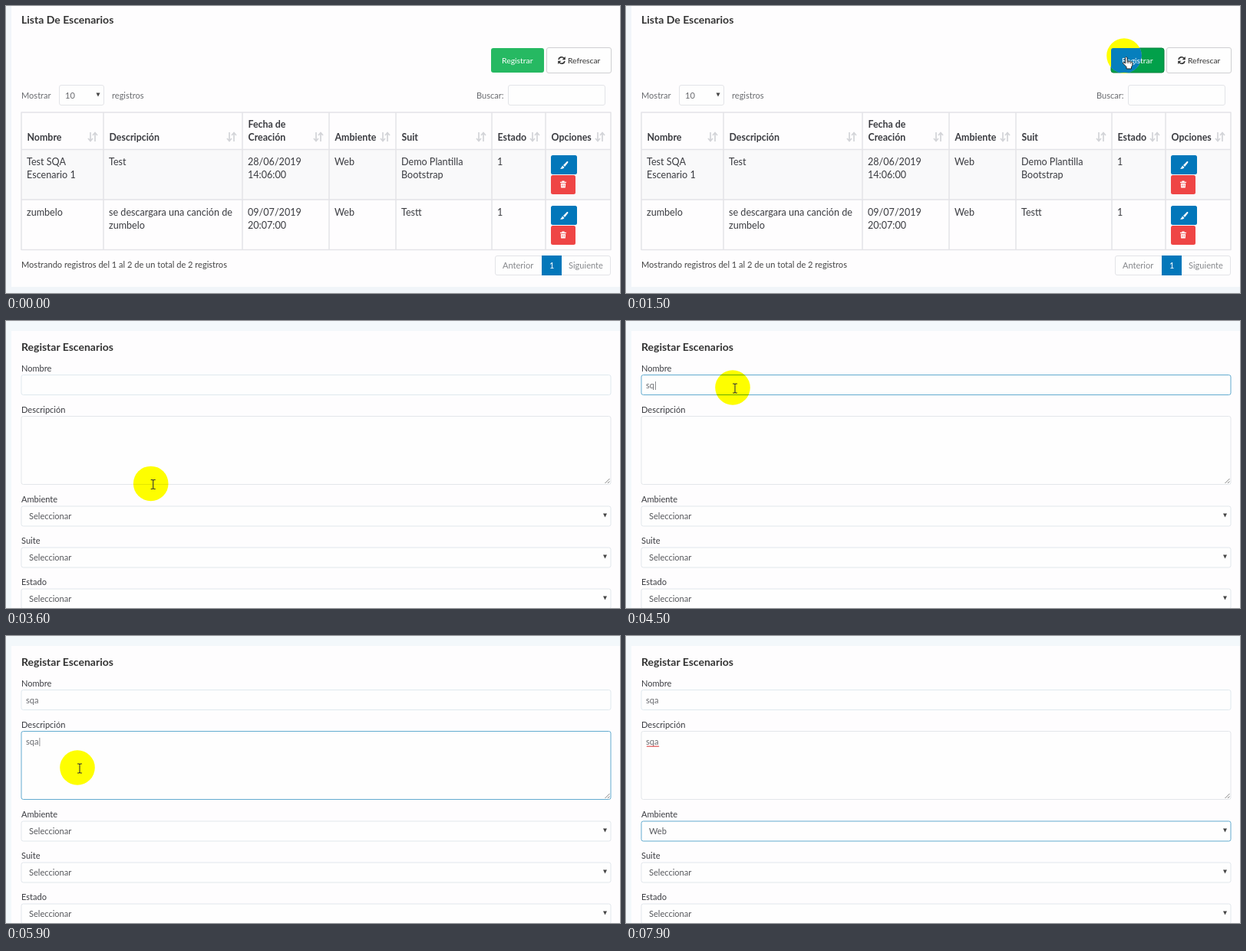
Animation, 800 px wide and 375 px high, one loop 8 s. Source, as an HTML page:

```html
<!DOCTYPE html>
<html lang="es">
<head>
<meta charset="utf-8">
<title>Escenarios</title>
<style>
html, body { margin: 0; width: 100%; height: 100%; overflow: hidden; background: #fefdfe; }
svg { display: block; width: 800px; height: 375px; font: 11.05px Lato, sans-serif; }
.spot { mix-blend-mode: multiply; fill: #ff0; }
</style>
</head>
<body>
<svg id="stage" viewBox="0 0 800 375"></svg>
<script>
const LOOP = 8000, STEP = 100;
const BLUE = '#0277ba', LINE = '#e3e4e8', FOCUS = '#62abcf', DARK = '#3a3b40', GREY = '#6a6c70';
const stage = document.getElementById('stage');

const rect = (x, y, w, h, fill, extra = '') =>
  `<rect x="${x}" y="${y}" width="${w}" height="${h}" fill="${fill}" ${extra}/>`;
const box = (x, y, w, h, stroke = LINE, fill = '#fefefe') =>
  rect(x + .5, y + .5, w - 1, h - 1, fill, `rx="2.5" stroke="${stroke}"`);
const text = (x, y, str, fill = DARK, extra = '') =>
  `<text x="${x}" y="${y}" fill="${fill}" ${extra}>${str}</text>`;
const path = (d, fill, extra = '') => `<path d="${d}" fill="${fill}" ${extra}/>`;
const at = (x, y, body) => `<g transform="translate(${x} ${y})">${body}</g>`;
const lines = (x, y, str, extra) =>
  str.split('|').map((s, i) => text(x, y + i * 17, s, DARK, extra)).join('');
const caretDown = (x, y) => path(`M${x - 2.5} ${y - 2.5}h5l-2.5 5z`, '#444');

// Table page
const BODY = 'font-size="12.6"', HEAD = 'font-size="12.4" font-weight="700"';
const columns = [20, 127, 308, 421, 508, 633, 703, 788];
const headers = ['Nombre', 'Descripción', 'Fecha de|Creación', 'Ambiente', 'Suit', 'Estado', 'Opciones'];
const records = [
  ['Test SQA|Escenario 1', 'Test', '28/06/2019|14:06:00', 'Web', 'Demo Plantilla|Bootstrap', '1'],
  ['zumbelo', 'se descargara una canción de|zumbelo', '09/07/2019|20:07:00', 'Web', 'Testt', '1']
];

const sortIcon = x => at(x, 171, path('M-3 -6V5M-6 2l3 3.5 3-3.5M3 6V-5M0 -2l3-3.5 3 3.5',
  'none', 'stroke="#d3d4d8" stroke-width="1.7"'));
const brush = path('M5 -5Q6 -4 5 -3L1 2-1 0 4 -5ZM-2 .5L.5 3Q-1 5.5-5 4.5-3.5 4-2 .5Z', '#fff');
const trash = path('M-4 -3.2h2.4v-1.2h3.2v1.2H4v1.2h-8zM-3.2-1.3h6.4L2.8 4.5h-5.6z', '#fff') +
  path('M-1.2 0v3M1.2 0v3', 'none', 'stroke="#ef4545" stroke-width=".7"');
const refresh = path('M-4 -1A4 4 0 0 1 3 -2.8M4 1A4 4 0 0 1 -3 2.8', 'none', 'stroke="#333" stroke-width="1.6"') +
  path('M4.8 -5v4.2H.6zM-4.8 5V.8H-.6z', '#333');

const options = y =>
  rect(710, y, 34, 25, BLUE, 'rx="2.5"') + at(727, y + 13, brush) +
  rect(710, y + 26, 32, 25, '#ef4545', 'rx="2.5"') + at(726, y + 38, trash);

const cells = (row, y) => row.map((s, i) => lines(columns[i] + 7, y, s, BODY)).join('');

function grid() {
  const v = columns.map(x => `M${x} 138.5V319`).join('');
  const h = [139, 187.5, 253, 318.5].map(y => `M20 ${y}H788`).join('');
  return rect(20, 188, 768, 65, '#f9f9fa') +
    path(v + h, 'none', 'stroke="#e4e4e8" stroke-width="1.5"') +
    headers.map((s, i) => lines(columns[i] + 7.5, s.includes('|') ? 159 : 176, s, HEAD) +
      sortIcon(columns[i + 1] - 14)).join('') +
    records.map((row, i) => cells(row, 208 + 66 * i) + options(195 + 66 * i)).join('');
}

const listStatic =
  rect(0, 0, 7, 375, '#f1f5f9') + rect(0, 367, 800, 8, '#f1f5f9') +
  text(20, 23, 'Lista De Escenarios', '#333', 'font-size="14" font-weight="700"') +
  box(704, 54, 85, 34, '#cfcfd2') + at(724, 71, refresh) +
  text(732, 75, 'Refrescar', '#333', 'font-size="10.3"') +
  text(20, 121, 'Mostrar', GREY) + box(69, 103, 59, 27) + text(77, 121, '10', GREY) + caretDown(120, 116) +
  text(138, 121, 'registros', GREY) + text(613, 121, 'Buscar:', GREY) + box(654, 103, 127, 27) +
  grid() +
  text(20, 342, 'Mostrando registros del 1 al 2 de un total de 2 registros', '#444') +
  box(637, 326, 151, 26) + rect(698, 326, 26, 26, BLUE) +
  text(647, 343, 'Anterior', '#85878b') + text(708, 343, '1', '#fff') + text(733, 343, 'Siguiente', '#85878b');

function listPage(t) {
  const hover = t >= 1000;
  const ring = t >= 1400 ? 'stroke="#08803a"' : '';
  const overlap = hover
    ? '<clipPath id="btn"><rect x="632" y="55" width="69" height="32" rx="3"/></clipPath>' +
      '<circle cx="649" cy="65" r="23" fill="#067fbd" clip-path="url(#btn)"/>' : '';
  return listStatic + (hover ? '' : rect(632, 55, 69, 32, '#26b962', 'rx="3"')) +
    (hover ? rect(632, 55, 69, 32, '#02a04a', `rx="3" ${ring}`) : '') +
    [overlap, text(646, 75, 'Registrar', '#fff', 'font-size="10.4"')].join('');
}

// Two discs pulsing in opposition
function loader(t) {
  const s = .5 - .5 * Math.cos(Math.PI * (t - 2030) / 1000);
  const disc = r => `<circle cx="294.5" cy="125.5" r="${r}" fill="#b9babd" opacity=".25"/>`;
  return disc(25 * s) + disc(25 * (1 - s));
}

// Form page
const select = (y, label, value, focused) =>
  text(20, y - 5, label) + box(19.5, y - .5, 769, 27, focused ? FOCUS : '#e1e7ec') +
  text(30, y + 17, value, '#55575b') + caretDown(780.5, y + 12);

function dropdown(active) {
  const items = ['Seleccionar', 'Web', 'Desk', 'Movil', 'Servicios'];
  return rect(20, 267.5, 768, 72, '#fefefe', 'stroke="#6faed0"') +
    rect(20.5, 268 + 14.2 * active, 767, 15, '#058fff') +
    items.map((s, i) => text(30, 279.5 + 14.1 * i, s, i === active ? '#fff' : '#55575b')).join('');
}

const typed = (t, start) => 'sqa'.slice(0, Math.max(0, Math.min(3, Math.floor((t - start) / 100) + 1)));

function formPage(t) {
  const frame = rect(0, 0, 800, 13, '#f3f8fb') + rect(0, 0, 7, 375, '#f3f8fb');
  const inName = t >= 4200 && t < 5300, inText = t >= 5300 && t < 6500, inSelect = t >= 6500;
  const open = t >= 6700 && t < 7500;
  const caret = on => on ? '|' : '';
  return frame +
    text(20, 38.5, 'Registar Escenarios', '#333', 'font-size="14" font-weight="700"') +
    text(20, 66, 'Nombre') + box(19.5, 70, 769, 27, inName ? FOCUS : '#dfe9ee') +
    text(26, 88, typed(t, 4400) + caret(inName), GREY) +
    text(20, 120, 'Descripción') + box(19.5, 124, 769, 90, inText ? FOCUS : '#e3e6ea') +
    text(26, 142, typed(t, 5600) + caret(inText), GREY) +
    (inSelect ? path('M27 145' + 'l1-1.5 1 1.5'.repeat(8), 'none', 'stroke="#e05050" stroke-width=".9"') : '') +
    path('M780.5 212l6-6M784 212l2.5-2.5', 'none', 'stroke="#777" stroke-width=".9"') +
    select(242, 'Ambiente', t >= 7500 ? 'Web' : 'Seleccionar', inSelect) +
    select(296, 'Suite', 'Seleccionar') + select(350, 'Estado', 'Seleccionar') +
    (open ? dropdown(t >= 7300 ? 1 : 0) : '');
}

// Pointer: time, x, y
const route = [
  [100, 560, 165], [200, 513, 182], [500, 513, 182], [800, 598, 107], [1000, 649, 65],
  [3000, 649, 65], [3700, 112, 237], [3800, 112, 237], [4100, 139, 87], [4700, 139, 87],
  [5200, 93, 172], [6000, 93, 172], [6400, 72, 253], [6700, 72, 253], [7000, 72, 281],
  [7200, 72, 281], [7300, 72, 290], [7500, 72, 290], [7700, 350, 222]
];

function pointerAt(t) {
  const i = route.findIndex(p => p[0] >= t);
  if (i < 1) return route[0].slice(1);
  const [a, b] = [route[i - 1], route[i]];
  const k = (t - a[0]) / (b[0] - a[0]);
  return [a[1] + (b[1] - a[1]) * k, a[2] + (b[2] - a[2]) * k];
}

const OUTLINE = 'stroke="#222" stroke-width="1" stroke-linejoin="round"';
const arrow = path('M.5 .5V13l3-2.8 2 4.8 2.2-1-2-4.6h4z', '#fff', OUTLINE);
const hand = path('M.5 2Q1.5 0 3 2V7Q4 5.5 5.2 7 6.5 6 7.5 7.5 9.5 6.7 9.8 9V12L8.5 14V16.5H2V14L-2.5 9.5Q-2.5 7.3-.8 8.3L.5 9.5Z',
  '#fff', OUTLINE) + path('M3 7v2.5M5.2 7.2v2.3M7.5 7.7V10', 'none', 'stroke="#222" stroke-width=".8"');
const beam = path('M-1 -5.5h2l1 .8 1-.8h2M2-4.7V5.7M-1 6.5h2l1-.8 1 .8h2', 'none', 'stroke="#333" stroke-width="1.1"');

function pointer(t) {
  if (t < 100 || t > 7700) return '';
  const [x, y] = pointerAt(t);
  const overField = t >= 2800 && ((y > 70 && y < 97) || (y > 124 && y < 214));
  const shape = overField ? beam : t >= 1000 && t < 2800 ? hand : arrow;
  return `<circle class="spot" cx="${x}" cy="${y}" r="22.8"/>` + at(x + 1, y + .5, shape);
}

// The spot keeps its blue tint over the button instead of multiplying with it
function scene(t) {
  if (t < 2000) {
    const page = listPage(t), tint = t >= 1000;
    if (!tint) return page + pointer(t);
    const cut = page.lastIndexOf('<clipPath');
    return page.slice(0, cut) + '<circle cx="649" cy="65" r="22.8" fill="#ff0"/>' + page.slice(cut) + at(650, 65.5, hand);
  }
  return (t < 2800 ? loader(t) : formPage(t)) + pointer(t);
}

let shown = -1;
function tick() {
  const t = Math.floor(performance.now() % LOOP / STEP) * STEP;
  if (t !== shown) stage.innerHTML = scene(shown = t);
  requestAnimationFrame(tick);
}
tick();
</script>
</body>
</html>
```
